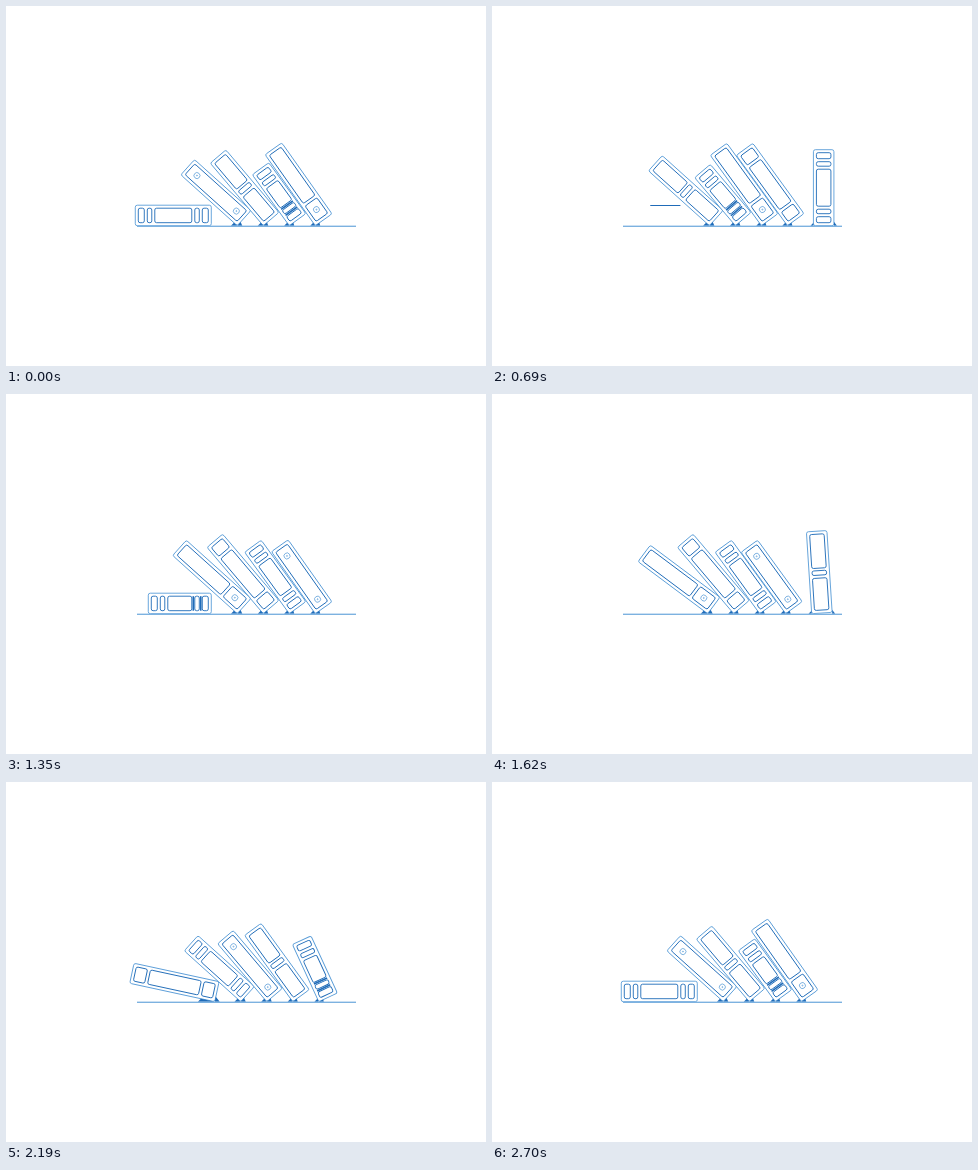
These frames come from a looping animation (480 by 360 pixels, 2.73 s). An HTML page with a canvas:

```html
<!DOCTYPE html>
<html lang="en">
<head>
<meta charset="utf-8">
<title>Bookshelf loader</title>
<style>
  html, body { margin: 0; width: 100%; height: 100%; overflow: hidden; background: #fff; }
  canvas { display: block; }
</style>
</head>
<body>
<canvas id="stage" width="480" height="360"></canvas>
<script>
const ctx = document.getElementById('stage').getContext('2d');
// One trip takes slightly less than the loop, so the first pose is held at the end.
const LOOP = 2730, TRIP = 2700, START = 430;
const SHELF = 219.7, WIDTH = 20.5, EDGE = 3;
const DARK = '#1f6bb8', LIGHT = '#5a9dd8', PALE = '#7db2e0';

// Cells are [from, to] along the spine, rings are centres, bars are bold gaps.
const books = [
  { length: 76, cells: [[3, 9], [12, 16.5], [19.5, 56.5], [59.5, 64], [67, 73]] },
  { length: 76, cells: [[3, 73]], rings: [12.5, 65.5] },
  { length: 82, cells: [[3, 37], [39.5, 44], [47, 79]] },
  { length: 63, cells: [[3, 9], [12, 16.5], [19.5, 43.5], [46.5, 51], [54, 60]], bars: [45, 52.5] },
  { length: 87, cells: [[3, 62], [65, 84]], rings: [74.5] },
  { length: 87, cells: [[3, 14.5], [17.5, 69.5], [72.5, 84]] }
];

const tiltKeys = [[0, 0], [.1, 0], [.176, 36], [.45, 36], [.485, 40.3], [.615, 40.3],
  [.652, 48], [.765, 48], [.841, 90], [1, 90]];
const stretchKeys = [[0, 1], [.065, 1.05], [.09, 1], [1, 1]];

function track(keys, p) {
  const i = keys.findIndex(key => key[0] > p);
  const [p0, v0] = keys[i - 1], [p1, v1] = keys[i];
  return v0 + (v1 - v0) * (p - p0) / (p1 - p0);
}

function box(x, y, w, h, r) {
  ctx.beginPath();
  ctx.roundRect(x, y, w, h, r);
}

function line(x0, y0, x1, y1) {
  ctx.beginPath();
  ctx.moveTo(x0, y0);
  ctx.lineTo(x1, y1);
  ctx.stroke();
}

function wedge(...points) {
  ctx.beginPath();
  points.forEach(([x, y]) => ctx.lineTo(x, y));
  ctx.fill();
}

function drawFeet(x, tilt) {
  const reach = 3 * Math.tan(tilt);
  ctx.fillStyle = DARK;
  wedge([x, SHELF], [x - reach, SHELF - 3], [x - reach - 3, SHELF]);
  if (tilt > .2) wedge([x, SHELF], [x + 5 * Math.cos(tilt), SHELF - 5 * Math.sin(tilt)], [x + 5, SHELF]);
  else wedge([x + WIDTH, SHELF], [x + WIDTH, SHELF - 4], [x + WIDTH + 3, SHELF]);
}

function drawBook({ length, cells, rings = [], bars = [] }, p) {
  if (p < .04 || p > .939) return;
  const x = 336.5 - 156 * p;
  ctx.strokeStyle = DARK;

  // A fading book leaves only its upper edge, shrinking to the right.
  if (p > .906) {
    ctx.lineWidth = 1;
    const right = x - 3;
    line(right - Math.min(length - 8, (.939 - p) * 3350), 199.5, right, 199.5);
    return;
  }

  const tilt = track(tiltKeys, p) * Math.PI / 180;
  ctx.save();
  ctx.translate(x, SHELF);
  ctx.rotate(-tilt);
  ctx.scale(1, track(stretchKeys, p));
  ctx.translate(0, -length);

  ctx.fillStyle = '#fff';
  ctx.strokeStyle = LIGHT;
  ctx.lineWidth = .9;
  box(0, 0, WIDTH, length, 2);
  ctx.fill();
  ctx.stroke();

  ctx.strokeStyle = DARK;
  for (const [from, to] of cells) {
    box(EDGE, from, WIDTH - 2 * EDGE, to - from, 1.8);
    ctx.stroke();
  }
  ctx.lineWidth = 1.6;
  for (const y of bars) line(EDGE, y, WIDTH - EDGE, y);

  ctx.strokeStyle = LIGHT;
  ctx.lineWidth = .7;
  for (const y of rings) {
    for (const r of [3, .5]) {
      ctx.beginPath();
      ctx.arc(WIDTH / 2, y, r, 0, 7);
      ctx.stroke();
    }
  }
  ctx.restore();
  if (tilt < 1.42) drawFeet(x, tilt);
}

function draw(now) {
  const time = now % LOOP;
  ctx.fillStyle = '#fff';
  ctx.fillRect(0, 0, 480, 360);
  for (const i of [5, 0, 1, 2, 3, 4]) {
    const p = (time - START) / TRIP - i / books.length;
    drawBook(books[i], p - Math.floor(p));
  }
  ctx.fillStyle = PALE;
  ctx.fillRect(131, 219.6, 219, 1.4);
  requestAnimationFrame(draw);
}
requestAnimationFrame(draw);
</script>
</body>
</html>
```
